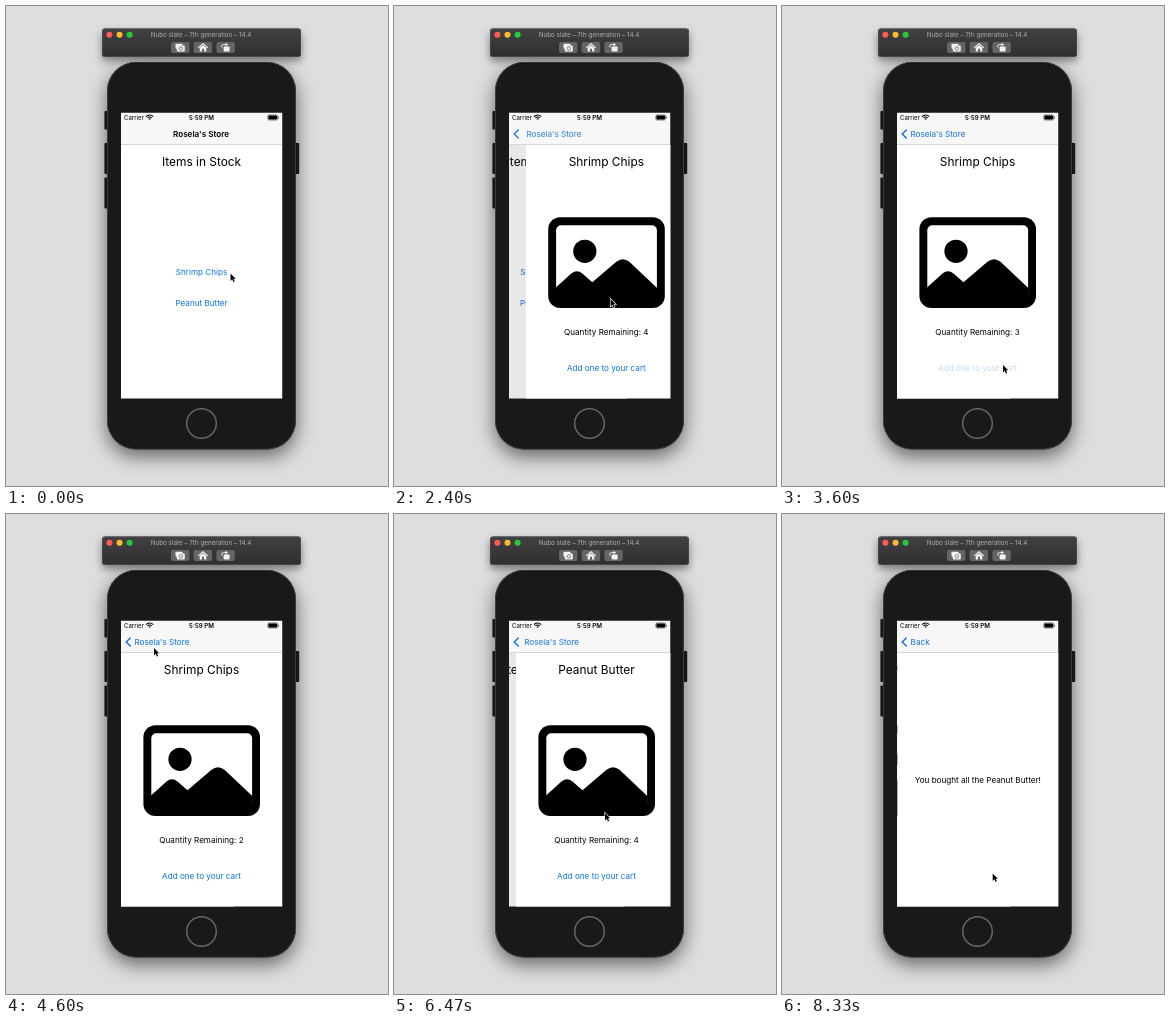
These frames come from a looping animation (382x480 px, 9.14 s). An HTML page with a canvas:

```html
<!DOCTYPE html>
<html lang="en">
<head>
<meta charset="utf-8">
<title>Store app in a simulator</title>
<style>
  html, body { margin: 0; width: 100%; height: 100%; overflow: hidden; background: #dedee0; }
  canvas { display: block; width: 382px; height: 480px; }
</style>
</head>
<body>
<canvas id="stage"></canvas>
<script>
const W = 382, H = 480, LOOP = 9140;
const SCREEN = { x: 115, y: 106.5, w: 161.5, h: 286 };
const MID = 195.5, BAR_BOTTOM = 139;
const BLUE = '#0b73e0';
const BODY = 8.15, HEADING = 11.9;
const STORE = "Rosela's Store";

const canvas = document.getElementById('stage');
const ctx = canvas.getContext('2d');
const ratio = window.devicePixelRatio || 1;
canvas.width = W * ratio;
canvas.height = H * ratio;

// Pointer stops: time, x, y
const pointerStops = [
  [0, 224.5, 267.5], [200, 224.5, 267.5], [330, 223.5, 267], [600, 223.5, 267],
  [850, 233, 283], [1070, 225.5, 292], [1600, 225.5, 292], [2000, 213, 267],
  [2200, 213, 267], [2670, 222, 333], [2900, 221, 359], [3800, 221, 359],
  [4200, 153, 142], [4400, 153, 142], [4580, 148, 134], [4800, 148, 134],
  [5270, 215, 215], [5450, 257, 268], [5670, 217.5, 294], [5870, 211, 299],
  [6470, 211, 299], [6900, 210.7, 359.5], [LOOP, 210.7, 359.5]
];

const shrimp = { item: 'Shrimp Chips', clicks: [3200, 3600] };
const peanut = { item: 'Peanut Butter', clicks: [6930, 7200, 7470, 7740] };

const clamp = v => Math.max(0, Math.min(1, v));
const mix = (a, b, p) => a + (b - a) * p;
const remaining = (t, start) => t < start ? 1 : Math.exp(-(t - start) / 80);

function pressOpacity(t, clicks) {
  return clicks.reduce((o, c) =>
    t < c ? o : Math.min(o, 0.25 + 0.75 * clamp((t - c - 70) / 140)), 1);
}

function fillBox(x, y, w, h, r, fill) {
  ctx.fillStyle = fill;
  ctx.beginPath();
  ctx.roundRect(x, y, w, h, r);
  ctx.fill();
}

function disc(x, y, r, fill) {
  ctx.fillStyle = fill;
  ctx.beginPath();
  ctx.arc(x, y, r, 0, 7);
  ctx.fill();
}

function strokePath(d, color, width) {
  ctx.strokeStyle = color;
  ctx.lineWidth = width;
  ctx.stroke(new Path2D(d));
}

function text(str, x, y, { size = BODY, color = '#000', weight = 400, align = 'center', alpha = 1 } = {}) {
  ctx.save();
  ctx.globalAlpha *= alpha;
  ctx.font = `${weight} ${size}px Inter, sans-serif`;
  ctx.textAlign = align;
  ctx.fillStyle = color;
  ctx.fillText(str, x, y);
  ctx.restore();
}

function shadow(color, blur, dy) {
  ctx.shadowColor = color;
  ctx.shadowBlur = blur * ratio;
  ctx.shadowOffsetY = dy * ratio;
}

function verticalGradient(y0, y1, ...colors) {
  const g = ctx.createLinearGradient(0, y0, 0, y1);
  colors.forEach((c, i) => g.addColorStop(i / (colors.length - 1), c));
  return g;
}

function drawTitleBar() {
  ctx.save();
  shadow('rgba(0,0,0,.45)', 9, 4);
  fillBox(96, 22.5, 199, 28.5, 3, '#333');
  ctx.restore();
  fillBox(96, 22.5, 199, 28.5, 3, '#5d5d5f');
  fillBox(96.4, 23, 198.2, 27.6, 3, verticalGradient(23, 51, '#414143', '#2f2f31'));
  ['#ff5b53', '#fdbb2d', '#28c840'].forEach((c, i) => disc(103.4 + i * 10.1, 28.8, 3, c));
  text('Nubo slate – 7th generation – 14.4', 195, 31.2, { size: 6.3, color: '#b0b0b1' });

  for (const x of [165, 187.7, 210.4]) fillBox(x, 36, 18.4, 11, 2, '#656567');
  const icon = '#f2f2f2';
  // Camera
  fillBox(169.5, 37.8, 7, 5, 0.8, icon);
  fillBox(170.8, 39.4, 8, 6, 1, icon);
  ctx.strokeStyle = '#656567';
  ctx.lineWidth = 0.8;
  ctx.beginPath();
  ctx.arc(174.8, 42.4, 1.7, 0, 7);
  ctx.stroke();
  // House
  strokePath('M192.2 41.8 L197 37.8 L201.8 41.8', icon, 1.1);
  ctx.fillStyle = icon;
  ctx.fill(new Path2D('M193.7 41.8 L197 39.2 L200.3 41.8 V45.6 H198 V42.8 H196 V45.6 H193.7 Z'));
  // Rotate
  fillBox(217.6, 40.5, 6, 5, 0.8, icon);
  strokePath('M215.8 41.5 V40 Q215.8 38.6 217.4 38.6 H220', icon, 0.9);
  ctx.fill(new Path2D('M219.6 36.8 L222 38.6 L219.6 40.4 Z'));
}

function drawPhone() {
  for (const [x, y, h] of [[98.4, 105, 18.5], [98.4, 137, 31], [98.4, 171.5, 31], [289, 137, 31]]) {
    fillBox(x, y, 4.2, h, 1, '#1d1d1e');
  }
  ctx.save();
  shadow('rgba(0,0,0,.55)', 19, 7);
  fillBox(101, 56, 189, 387.5, 29, '#1b1b1c');
  ctx.restore();
  fillBox(101, 56, 189, 387.5, 29, '#47474a');
  fillBox(101.8, 56.8, 187.4, 385.9, 28.2, '#19191a');
  ctx.strokeStyle = '#666668';
  ctx.lineWidth = 1.5;
  ctx.beginPath();
  ctx.arc(MID, 417.5, 14.8, 0, 7);
  ctx.stroke();
}

function drawPicture() {
  fillBox(137.4, 211.2, 116.6, 90.8, 12, '#000');
  fillBox(145.3, 219.2, 100.8, 74, 5, '#fff');
  disc(174, 245.3, 11.6, '#000');
  ctx.fillStyle = '#000';
  ctx.fill(new Path2D(`M145 281.5 L160.5 267.5 Q166 263 171.5 267.5 L181.5 276.2
    L205.5 255.8 Q212 250.8 218.5 255.8 L246.3 282 V295 H145 Z`));
}

function drawHome(t) {
  text('Items in Stock', MID, 159.5, { size: HEADING });
  text('Shrimp Chips', MID, 269.4, { color: BLUE, alpha: pressOpacity(t, [2070]) });
  text('Peanut Butter', MID, 299.8, { color: BLUE, alpha: pressOpacity(t, [6120]) });
}

function drawDetail(t, { item, clicks }) {
  const left = 4 - clicks.filter(c => t >= c + 70).length;
  text(item, MID, 159.5, { size: HEADING });
  drawPicture();
  text(`Quantity Remaining: ${left}`, MID, 329, {});
  text('Add one to your cart', MID, 364.8, { color: BLUE, alpha: pressOpacity(t, clicks) });
}

function drawSoldOut() {
  text('You bought all the Peanut Butter!', MID, 269, {});
}

function drawPage(dx, draw) {
  ctx.save();
  ctx.translate(dx, 0);
  ctx.fillStyle = '#fff';
  ctx.fillRect(SCREEN.x, BAR_BOTTOM, SCREEN.w, SCREEN.h);
  draw();
  ctx.restore();
}

// The upper page covers the lower one by the fraction `cover`.
function drawStack(lower, upper, cover) {
  drawPage(-0.3 * SCREEN.w * cover, lower);
  if (cover <= 0.001) return;
  ctx.fillStyle = `rgba(0,0,0,${0.1 * cover})`;
  ctx.fillRect(SCREEN.x, BAR_BOTTOM, SCREEN.w, SCREEN.h);
  drawPage(SCREEN.w * (1 - cover), upper);
}

function drawNavBar(detail, soldOut) {
  ctx.fillStyle = '#f7f7f7';
  ctx.fillRect(SCREEN.x, SCREEN.y, SCREEN.w, BAR_BOTTOM - SCREEN.y);
  ctx.fillStyle = '#c4c4c6';
  ctx.fillRect(SCREEN.x, BAR_BOTTOM - 0.6, SCREEN.w, 0.6);

  const x = mix(167, 128.5, detail) - 40 * soldOut;
  text(STORE, x, 130.5, { weight: 600, align: 'left', alpha: clamp(1 - detail * 1.3) });
  text(STORE, x, 130.5, { color: BLUE, align: 'left', alpha: detail * (1 - soldOut) });
  text('Back', mix(185, 128.5, soldOut), 130.5, { color: BLUE, align: 'left', alpha: soldOut });
  ctx.globalAlpha = detail;
  ctx.lineCap = 'round';
  strokePath('M124.3 123.9 L120.2 128 L124.3 132.1', BLUE, 1.4);
  ctx.globalAlpha = 1;
  ctx.lineCap = 'butt';
}

function drawStatus() {
  text('Carrier', 118, 113.8, { size: 6.1, align: 'left' });
  text('5:59 PM', MID, 113.8, { size: 6.2, weight: 600 });
  ctx.strokeStyle = '#000';
  ctx.lineWidth = 1.1;
  for (const r of [1, 3, 5]) {
    ctx.beginPath();
    ctx.arc(143.6, 114, r, -Math.PI * 0.76, -Math.PI * 0.24);
    ctx.stroke();
  }
  ctx.lineWidth = 0.5;
  ctx.beginPath();
  ctx.roundRect(261.8, 109, 9.8, 5, 1.4);
  ctx.stroke();
  fillBox(262.4, 109.6, 8.6, 3.8, 0.8, '#000');
  fillBox(272, 110.7, 0.7, 1.6, 0.3, '#000');
}

function drawScreen(t) {
  const first = t < 5500;
  const product = first ? shrimp : peanut;
  const pushed = 1 - remaining(t, first ? 2220 : 6220);
  const detail = first ? pushed * remaining(t, 4740) : pushed;
  const soldOut = 1 - remaining(t, 7830);
  const showDetail = () => drawDetail(t, product);

  ctx.save();
  ctx.beginPath();
  ctx.rect(SCREEN.x, SCREEN.y, SCREEN.w, SCREEN.h);
  ctx.clip();
  if (soldOut > 0) drawStack(showDetail, drawSoldOut, soldOut);
  else drawStack(() => drawHome(t), showDetail, detail);
  drawNavBar(detail, soldOut);
  drawStatus();
  ctx.restore();
}

function drawPointer(t) {
  const i = pointerStops.findIndex(s => s[0] > t);
  const [t0, x0, y0] = pointerStops[i - 1];
  const [t1, x1, y1] = pointerStops[i];
  const u = (t - t0) / (t1 - t0), p = u * u * (3 - 2 * u);
  ctx.save();
  ctx.translate(mix(x0, x1, p), mix(y0, y1, p));
  const arrow = 'M0 0 V7.4 L1.7 5.8 L2.9 8.5 L4.2 7.9 L3 5.3 H5.2 Z';
  strokePath(arrow, '#fff', 1.2);
  ctx.fillStyle = '#000';
  ctx.fill(new Path2D(arrow));
  ctx.restore();
}

function render() {
  const t = performance.now() % LOOP;
  ctx.setTransform(ratio, 0, 0, ratio, 0, 0);
  ctx.fillStyle = '#dedee0';
  ctx.fillRect(0, 0, W, H);
  drawPhone();
  drawTitleBar();
  drawScreen(t);
  drawPointer(t);
  requestAnimationFrame(render);
}
render();
</script>
</body>
</html>
```
